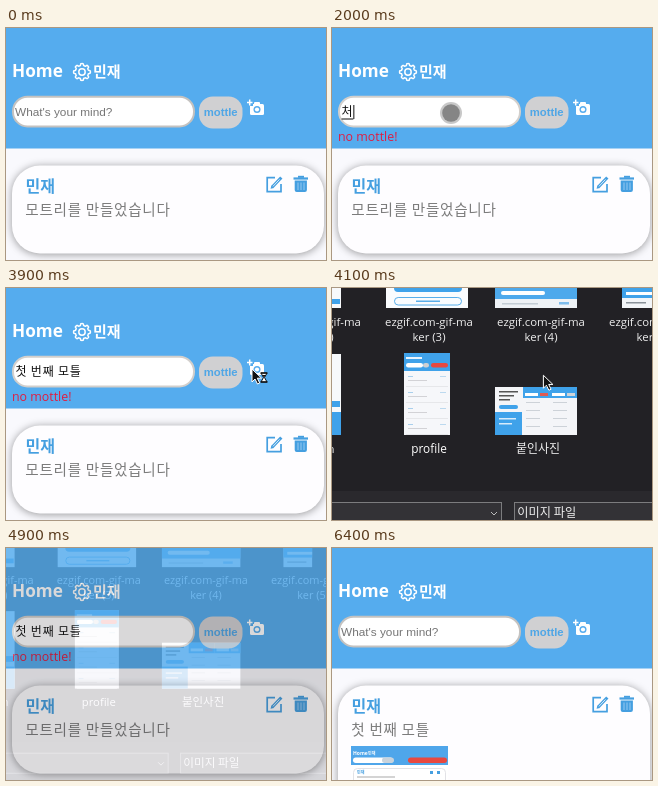
Write an HTML page with a canvas that moves like this. It is 320 by 232 pixels and loops after 7.1 s.

```html
<!DOCTYPE html>
<html lang="ko">
<head>
<meta charset="utf-8">
<title>Posting with a picture</title>
<style>
html, body { margin: 0; width: 100%; height: 100%; overflow: hidden; background: #f9f9fd; }
canvas { display: block; width: 320px; height: 232px; }
</style>
</head>
<body>
<canvas id="stage"></canvas>
<script>
const W = 320, H = 232, LOOP = 7100;
const dpr = window.devicePixelRatio || 1;
const BLUE = '#55acee', SKY = '#3fa2ea', ACCENT = '#459fe0';
const KR = '"Noto Sans CJK KR", "Noto Sans CJK", sans-serif';
const UI = '"Open Sans", "Noto Sans CJK KR", sans-serif';
const ARIAL = '"Liberation Sans", sans-serif';
const USER = '민재', BRAND = 'mottle';
const ERROR_AT = 800, POST_AT = 5500;

const stage = document.getElementById('stage');
const layer = document.createElement('canvas');
for (const c of [stage, layer]) {
  c.width = W * dpr;
  c.height = H * dpr;
  c.getContext('2d').scale(dpr, dpr);
}
const main = stage.getContext('2d');
const over = layer.getContext('2d');
let g = main;

// Typing, syllable by syllable: [time, settled text, syllable in composition]
const KEYS = [
  [1900, '', 'ㅊ'], [2000, '', '처'], [2100, '', '첫'],
  [2200, '첫 ', 'ㅂ'], [2300, '첫 ', '번'], [2400, '첫 번', 'ㅉ'],
  [2500, '첫 번', '째'], [2600, '첫 번째 ', 'ㅁ'], [2700, '첫 번째 ', '못'],
  [2800, '첫 번째 모', '트'], [3000, '첫 번째 모', '틀']
];

const ramp = (t, a, b) => Math.min(1, Math.max(0, (t - a) / (b - a)));

function text(s, x, y, font, color, align = 'left') {
  g.font = font;
  g.fillStyle = color;
  g.textAlign = align;
  g.fillText(s, x, y);
}

function rect(x, y, w, h, color) {
  g.fillStyle = color;
  g.fillRect(x, y, w, h);
}

function frame(x, y, w, h, color) {
  g.strokeStyle = color;
  g.lineWidth = 1;
  g.strokeRect(x + .5, y + .5, w - 1, h - 1);
}

function round(x, y, w, h, r) {
  g.beginPath();
  g.roundRect(x, y, w, h, r);
}

function pill(x, y, w, h, color) {
  round(x, y, w, h, h / 2);
  g.fillStyle = color;
  g.fill();
}

function line(points, color, width) {
  g.beginPath();
  points.forEach(([x, y], i) => i ? g.lineTo(x, y) : g.moveTo(x, y));
  g.strokeStyle = color;
  g.lineWidth = width;
  g.stroke();
}

function polygon(points, fill, stroke) {
  g.beginPath();
  points.forEach(([x, y]) => g.lineTo(x, y));
  g.closePath();
  g.fillStyle = fill;
  g.fill();
  if (stroke) {
    g.strokeStyle = stroke;
    g.lineWidth = 1;
    g.stroke();
  }
}

function disc(x, y, r, color) {
  g.beginPath();
  g.arc(x, y, r, 0, 7);
  g.fillStyle = color;
  g.fill();
}

function gear(x, y) {
  g.beginPath();
  for (let a = 0; a < 6.28; a += .05) {
    const r = 7.5 + .9 * Math.tanh(3 * Math.cos(8 * a));
    g.lineTo(x + r * Math.cos(a), y + r * Math.sin(a));
  }
  g.closePath();
  g.moveTo(x + 3.2, y);
  g.arc(x, y, 3.2, 0, 6.29);
  g.strokeStyle = '#fff';
  g.lineWidth = 1.5;
  g.stroke();
}

function camera() {
  g.fillStyle = '#fff';
  round(244, 76, 14, 11, 1.5);
  g.fill();
  round(248, 74, 6, 4, 1);
  g.fill();
  rect(240.5, 71, 6.5, 7, BLUE);
  line([[241, 74.5], [246.5, 74.5]], '#fff', 1.5);
  line([[243.7, 71.5], [243.7, 77.5]], '#fff', 1.5);
  disc(251, 81.5, 3.5, BLUE);
  disc(251, 81.5, 2.1, '#fff');
}

function pencil() {
  line([[269, 149.6], [261.2, 149.6], [261.2, 163.6], [275, 163.6], [275, 156]], ACCENT, 1.7);
  line([[266.3, 159], [275.3, 149.5]], ACCENT, 3.2);
  line([[266.8, 158.5], [273.5, 151.4]], '#fff', .8);
  polygon([[264.6, 160.8], [265.4, 157.5], [268, 160]], ACCENT);
}

function trash() {
  rect(287.5, 149.4, 14.5, 2.2, ACCENT);
  rect(292, 147.8, 6, 2, ACCENT);
  g.fillStyle = ACCENT;
  round(288.7, 152.4, 12.2, 11.6, [0, 0, 2, 2]);
  g.fill();
  for (const x of [292, 295, 298]) line([[x, 154.5], [x, 162]], '#9fcff3', .9);
}

function arrow(x, y) {
  const shape = [[0, 0], [0, 13], [3, 10], [5.5, 15], [7.7, 14], [5.3, 9.2], [9.5, 9.2]];
  polygon(shape.map(([a, b]) => [x + a, y + b]), '#111', '#fff');
}

function hourglass(x, y) {
  polygon([[x, y], [x + 6, y], [x + 3.5, y + 4.5], [x + 6, y + 9], [x, y + 9], [x + 2.5, y + 4.5]], '#fff', '#111');
  polygon([[x + 1.3, y + 2], [x + 4.7, y + 2], [x + 3, y + 4.5]], '#111');
  line([[x - .5, y], [x + 6.5, y]], '#111', 1.4);
  line([[x - .5, y + 9], [x + 6.5, y + 9]], '#111', 1.4);
}

function touch(x, y) {
  disc(x, y, 11, 'rgba(190,190,190,.85)');
  disc(x, y, 8.8, '#858585');
}

function field(t) {
  const keys = t < POST_AT ? KEYS.filter(k => k[0] <= t) : [];
  round(7, 68.8, 181, 29.6, 14.5);
  g.fillStyle = '#fff';
  g.fill();
  g.strokeStyle = keys.length ? '#d2cfcc' : '#c4c2c0';
  g.lineWidth = 2;
  g.stroke();
  if (!keys.length) {
    text("What's your mind?", 9, 87.5, '11.8px ' + ARIAL, '#757575');
    if (t >= 1400 && t < 1600) rect(9, 77, 1, 14, '#111');
    return;
  }
  const [, done, now] = keys[keys.length - 1];
  g.letterSpacing = '.8px';
  text(done + now, 9.5, 88, '12px ' + KR, '#111');
  const a = 9.5 + g.measureText(done).width;
  const b = 9.5 + g.measureText(done + now).width;
  g.letterSpacing = '0px';
  if (t >= 3300) return;
  rect(a, 90.5, b - a, 1, '#111');
  rect(b, 77, 1, 14, '#111');
}

// Small picture of the page, used in the post
function postPicture(x, y) {
  rect(x, y, 97, 40, '#fff');
  rect(x, y, 97, 19, '#4fa6ea');
  text('Home', x + 2, y + 8.5, 'bold 5px ' + UI, '#fff');
  text(USER, x + 17, y + 8.5, 'bold 4px ' + KR, '#fff');
  pill(x + 2, y + 11.5, 40, 5.5, '#fff');
  pill(x + 31, y + 11.5, 12, 5.5, '#c9d3dc');
  pill(x + 57, y + 11.5, 39, 5.5, '#e8483f');
  round(x + 2.5, y + 22.5, 92, 17, 4);
  g.strokeStyle = '#e2e2e6';
  g.lineWidth = 1;
  g.stroke();
  text(USER, x + 6, y + 28, 'bold 4px ' + KR, ACCENT);
  rect(x + 79, y + 25, 3, 3, ACCENT);
  rect(x + 86, y + 25, 3, 3, ACCENT);
  rect(x + 6, y + 30.5, 38, 1, '#aaa');
}

function page(t) {
  const posted = t >= POST_AT;
  rect(0, 0, W, H, '#f9f9fd');
  rect(0, 0, W, 120.5, BLUE);
  text('Home', 6, 49, 'bold 17.2px ' + UI, '#fff');
  gear(76, 44);
  text(USER, 87, 49, 'bold 15px ' + KR, '#fff');
  field(t);
  round(193, 68.5, 43.5, 32, 14);
  g.fillStyle = '#d0d0d2';
  g.fill();
  text(BRAND, 214.7, 87.5, 'bold 11.3px ' + ARIAL, '#4fa6e6', 'center');
  camera();
  if (t >= ERROR_AT && !posted) text('no ' + BRAND + '!', 6, 113, '12.4px ' + UI, '#e01c40');

  g.save();
  g.shadowColor = 'rgba(0,0,0,.4)';
  g.shadowBlur = 8 * dpr;
  g.shadowOffsetY = dpr;
  g.fillStyle = '#fefdff';
  round(6, 137.5, 312, posted ? 160 : 88, 28);
  g.fill();
  g.restore();
  text(USER, 19.5, 164, 'bold 16px ' + KR, ACCENT);
  pencil();
  trash();
  g.letterSpacing = '.7px';
  const post = posted ? '첫 번째 모틀' : '모트리를 만들었습니다';
  text(post, 19.3, 187, '14.6px ' + KR, '#7c7c7c');
  g.letterSpacing = '0px';
  if (posted) postPicture(19, 198);
}

function wideThumb(x, y) {
  rect(x, y, 82, 48, '#f4f5f8');
  for (let i = 0; i < 3; i++) rect(x + 4, y + 4 + i * 4, 19 - i * 4, 1.5, '#555');
  pill(x + 4, y + 18, 19, 4, SKY);
  rect(x, y + 25, 27, 23, SKY);
  rect(x + 4, y + 31, 17, 1.5, '#d8ecfb');
  rect(x + 4, y + 36, 13, 1.5, '#d8ecfb');
  for (const dx of [28, 55]) {
    rect(x + dx, y, 27, 11, SKY);
    rect(x + dx + 2, y + 6, 13, 3, '#fff');
    rect(x + dx + 17, y + 6, 8, 3, dx > 30 ? '#d0d4d8' : '#e05a52');
    for (let i = 0; i < 4; i++) rect(x + dx + 3, y + 15 + i * 8, 14, 1, '#cdd2d8');
  }
}

function tallThumb(x, y) {
  rect(x, y, 46, 82, '#f6f7fa');
  rect(x, y, 46, 18, SKY);
  rect(x + 2, y + 4, 16, 2, '#e8f4fd');
  pill(x + 2, y + 10, 17, 4.5, '#fff');
  pill(x + 19, y + 10, 6, 4.5, '#d0d0d2');
  pill(x + 27, y + 10, 17, 4.5, '#e8483f');
  for (let i = 0; i < 4; i++) {
    const top = y + 20 + i * 16;
    rect(x + 2, top + 13, 42, 1, '#e6e7ea');
    rect(x + 4, top + 3, 5, 1, '#a9cfec');
    rect(x + 4, top + 7, 19, 1, '#d2d2d6');
    rect(x + 36, top + 3, 6, 1, '#bcd9ef');
  }
}

function upperRow() {
  rect(0, 0, 9, 20, '#f7f9fb');
  rect(0, 11, 8, 5, SKY);
  rect(54, 0, 82, 20, '#fafcfe');
  pill(62, -4, 68, 8, SKY);
  round(62.5, 9.5, 67, 7.5, 3.7);
  g.strokeStyle = '#58aeea';
  g.lineWidth = 1;
  g.stroke();
  rect(84, 12.5, 24, 1.5, '#58aeea');
  rect(163, 0, 82, 20, '#eef2f6');
  rect(163, 0, 82, 11, '#4da9ec');
  pill(169, 3, 44, 4, '#fff');
  rect(170, 15, 36, 1.5, '#c4ced6');
  rect(227, 14, 10, 2.5, '#7dbcec');
  rect(290, 0, 30, 20, '#f2f5f8');
  rect(290, 0, 30, 10, SKY);
  rect(294, 4, 26, 3, '#fff');
  rect(294, 14, 20, 1.5, '#8a929a');
}

function label(col, n) {
  const x = 97 + 112 * col;
  text('ezgif.com-gif-ma', x, 38, '11.4px ' + UI, '#eee', 'center');
  text(`ker (${n})`, x, 53, '11.4px ' + UI, '#eee', 'center');
}

function dialog(t) {
  rect(0, 0, W + 40, H + 40, '#222125');
  upperRow();
  for (let i = -1; i < 3; i++) label(i, i + 3);

  rect(0, 66, 9, 81, '#f7f9fb');
  rect(0, 113, 8, 6, SKY);
  rect(0, 124, 9, 23, SKY);
  text('n', -4.5, 165, '11.4px ' + UI, '#eee');
  const hover = t >= 4300 && t < 4800;
  if (hover) rect(48, 60, 98.5, 111, '#4a494c');
  tallThumb(72, 65);
  text('profile', 97, 165, '11.8px ' + UI, '#fff', 'center');
  wideThumb(163, 99);
  text('붙인사진', 206, 165, '12px ' + KR, '#eee', 'center');

  // File name and type
  rect(0, 203, W + 40, 70, '#2a292d');
  rect(-1, 214, 171, 22, '#333236');
  frame(-1, 214, 171, 22, '#7c7c7e');
  line([[159, 224], [162, 227], [165, 224]], '#bbb', 1);
  rect(182, 214, 180, 22, '#333236');
  frame(182, 214, 180, 22, '#7c7c7e');
  text('이미지 파일', 185.3, 229, '12.2px ' + KR, '#eee');
  if (t < 4800) {
    const k = ramp(t, 4000, 4400);
    arrow(246 - 138.5 * k, 81 + 25 * k);
  }
}

// The window grows slightly while it fades in, and shrinks while it fades out
function showDialog(t) {
  const k = Math.min(ramp(t, 3900, 4100), 1 - ramp(t, 4700, 4940));
  if (k <= 0) return;
  const size = 1 - .052 * (1 - k);
  g = over;
  over.save();
  over.scale(size, size);
  dialog(t);
  over.restore();
  g = main;
  main.globalAlpha = k;
  main.drawImage(layer, 0, 0, W, H);
  main.globalAlpha = 1;
}

function pointer(t) {
  if (t >= 1400 && t < 2800) touch(119, 85);
  if (t >= 3500 && t < 4000) {
    const k = ramp(t, 3400, 3800);
    arrow(214 + 32 * k, 92 - 11 * k);
    if (t >= 3900) hourglass(255, 85);
  }
}

function draw(t) {
  g = main;
  page(t);
  pointer(t);
  showDialog(t);
}

function tick(now) {
  draw(Math.floor(now % LOOP / 100) * 100);
  requestAnimationFrame(tick);
}
requestAnimationFrame(tick);
</script>
</body>
</html>
```
